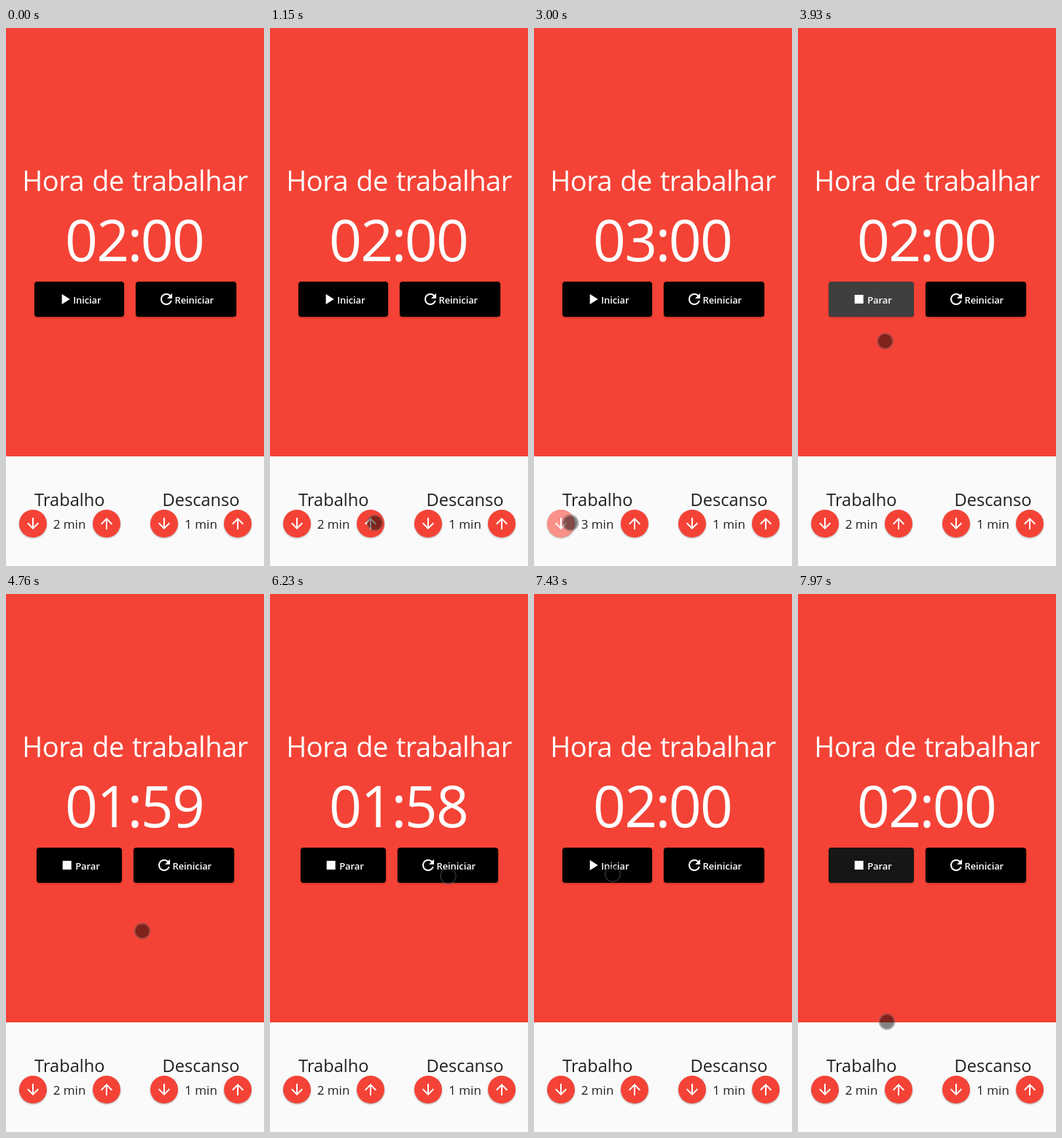
An HTML page that plays this animation: 354 by 736 pixels, repeating every 8000 ms.

```html
<!DOCTYPE html>
<html lang="pt">
<head>
<meta charset="utf-8">
<title>Temporizador</title>
<style>
  html, body { margin: 0; width: 100%; height: 100%; overflow: hidden; background: #fafafa; }
  svg { display: block; width: 100vw; height: 100vh; font-family: "Open Sans", "Noto Sans", sans-serif; }
  text { fill: #fff; }
  .mid, .dark { text-anchor: middle; }
  .dark { fill: #1f1f1f; }
  .title { font-size: 38px; font-weight: 450; letter-spacing: -.5px; word-spacing: 1.7px; }
  .clock { font-size: 78.5px; }
  .head { font-size: 23.6px; }
  .span { font-size: 17px; }
  .label { font-size: 13px; font-weight: 600; letter-spacing: -.1px; }
  .raised { filter: drop-shadow(0 1px 1px rgba(0, 0, 0, .32)); }
  .icon { fill: #fff; }
</style>
</head>
<body>
<svg id="stage" viewBox="0 0 354 736">
  <rect width="354" height="586" fill="#f44336"/>
  <rect y="586" width="354" height="150" fill="#fafafa"/>
  <text class="mid title" x="177" y="223">Hora de trabalhar</text>
  <text class="mid clock" id="clock" y="319.3"></text>
  <text class="dark head" x="87.3" y="653.5">Trabalho</text>
  <text class="dark head" x="267.5" y="653.5">Descanso</text>
  <text class="dark span" id="work" x="87" y="685"></text>
  <text class="dark span" x="267.5" y="685">1 min</text>
</svg>
<script>
const LOOP = 8000, FADE = 525, SECOND = 1010;
const stage = document.getElementById('stage');
const clock = document.getElementById('clock');
const work = document.getElementById('work');

const ICONS = {
  play: 'M8 5v14l11-7z',
  stop: 'M6 6h12v12H6z',
  reset: 'M17.65 6.35A7.96 7.96 0 0 0 12 4a8 8 0 1 0 7.73 10h-2.08A6 6 0 1 1 12 6c1.66 0 3.14.69 4.22 1.78L13 11h7V4z',
  down: 'M20 12l-1.41-1.41L13 16.17V4h-2v12.17l-5.58-5.59L4 12l8 8z',
  up: 'M4 12l1.41 1.41L11 7.83V20h2V7.83l5.58 5.59L20 12l-8-8z'
};

function set(el, attrs) {
  for (const k in attrs) el.setAttribute(k, attrs[k]);
}
function add(parent, tag, attrs) {
  const el = document.createElementNS('http://www.w3.org/2000/svg', tag);
  set(el, attrs);
  parent.appendChild(el);
  return el;
}

let clips = 0;
function makeButton(shape, attrs, fill, reach) {
  const id = 'clip' + clips++;
  const hole = add(add(stage, 'clipPath', { id }), shape, attrs);
  const base = add(stage, shape, { ...attrs, fill, class: 'raised' });
  const splash = add(add(stage, 'g', { 'clip-path': `url(#${id})` }), 'circle', { fill: '#fff', opacity: 0 });
  const icon = add(stage, 'path', { class: 'icon' });
  return { hole, base, splash, icon, reach };
}

function roundButton(cx, name) {
  const b = makeButton('circle', { cx, cy: 678, r: 19 }, '#f44336', 45);
  set(b.icon, { d: ICONS[name], transform: `translate(${cx - 12} 666)` });
  return b;
}

function wideButton() {
  const b = makeButton('rect', { y: 347, height: 48, rx: 4 }, '#000', 130);
  b.label = add(stage, 'text', { class: 'label', y: 376.5 });
  return b;
}

// icon and label follow the button's left edge
function layOut(b, x, width, icon, label, inset) {
  set(b.hole, { x, width });
  set(b.base, { x, width });
  set(b.icon, { d: ICONS[icon], transform: `translate(${x + inset} 359)` });
  set(b.label, { x: x + inset + 23.5 });
  b.label.textContent = label;
}

const less = roundButton(37, 'down');
const more = roundButton(138, 'up');
roundButton(217, 'down');
roundButton(318, 'up');
const start = wideButton();
const reset = wideButton();

const cursor = add(stage, 'g', {});
add(cursor, 'circle', { r: 9.6, fill: '#000', opacity: .48 });
add(cursor, 'circle', { r: 10.5, fill: 'none', stroke: '#555', 'stroke-width': 1.9, opacity: .45 });

const ENTER = { x: 300, y: 740 };
const MOVES = [
  { from: 195, to: 340, x: 134, y: 529 },
  { from: 500, to: 1150, x: 144, y: 677, bend: 55 },
  { from: 2200, to: 2800, x: 50, y: 677 },
  { from: 3430, to: 3660, x: 108, y: 378 },
  { from: 3700, to: 4220, x: 133, y: 448, bend: 7 },
  { from: 4440, to: 4760, x: 187, y: 461 },
  { from: 5560, to: 6390, x: 245, y: 382, bend: 14 },
  { from: 6690, to: 7330, x: 108, y: 383, bend: -92 },
  { from: 7620, to: 7970, x: 122, y: 585 }
];

const run = (s, t) => { s.since = t; };
const TAPS = [
  { button: more, press: 1840, release: 2100, act: s => { s.minutes++; } },
  { button: less, press: 2830, release: 3080, act: s => { s.minutes--; } },
  { button: start, press: 3660, release: 3720, act: run },
  { button: reset, press: 6570, release: 6680, act: s => { s.since = null; } },
  { button: start, press: 7490, release: 7555, act: run }
];

const clamp = v => Math.max(0, Math.min(1, v));

// each move eases out along an arc that bulges sideways by `bend`
function pointer(t) {
  let at = ENTER;
  for (const { from, to, x, y, bend = 0 } of MOVES) {
    if (t < from) break;
    const u = 1 - (1 - clamp((t - from) / (to - from))) ** 2;
    const dx = x - at.x, dy = y - at.y;
    const side = bend * 4 * u * (1 - u) / Math.hypot(dx, dy);
    at = { x: at.x + dx * u - dy * side, y: at.y + dy * u + dx * side };
  }
  return at;
}

function showState(t) {
  const state = { minutes: 2, since: null };
  for (const tap of TAPS) if (t >= tap.release) tap.act(state, tap.release);

  const running = state.since !== null;
  const left = state.minutes * 60 - (running ? Math.floor((t - state.since) / SECOND) : 0);
  clock.textContent = '0' + Math.floor(left / 60) + ':' + String(left % 60).padStart(2, '0');
  work.textContent = state.minutes + ' min';

  if (running) layOut(start, 42, 117, 'stop', 'Parar', 29.7);
  else layOut(start, 39, 123, 'play', 'Iniciar', 29.7);
  layOut(reset, running ? 175 : 178, 138, 'reset', 'Reiniciar', 30);
}

function showSplash(t) {
  for (const { button } of TAPS) set(button.splash, { opacity: 0 });
  for (const { button, press, release } of TAPS) {
    if (t < press || t > release + FADE) continue;
    const { x, y } = pointer(press);
    set(button.splash, {
      cx: x, cy: y,
      r: button.reach * clamp((t - press) / 220),
      opacity: .41 * clamp((t - press) / 75) * clamp(1 - (t - release) / FADE)
    });
  }
}

function draw(t) {
  showState(t);
  showSplash(t);
  const { x, y } = pointer(t);
  set(cursor, { transform: `translate(${x} ${y})`, visibility: t < 210 ? 'hidden' : 'visible' });
}

// equal digit cells on both sides of a narrow colon
set(clock, { x: [-1.7, -.7, 0, .7, 1.7].map(n => 177 + n * 43.2).join(' ') });

function tick() {
  draw(performance.now() % LOOP);
  requestAnimationFrame(tick);
}
tick();
</script>
</body>
</html>
```
